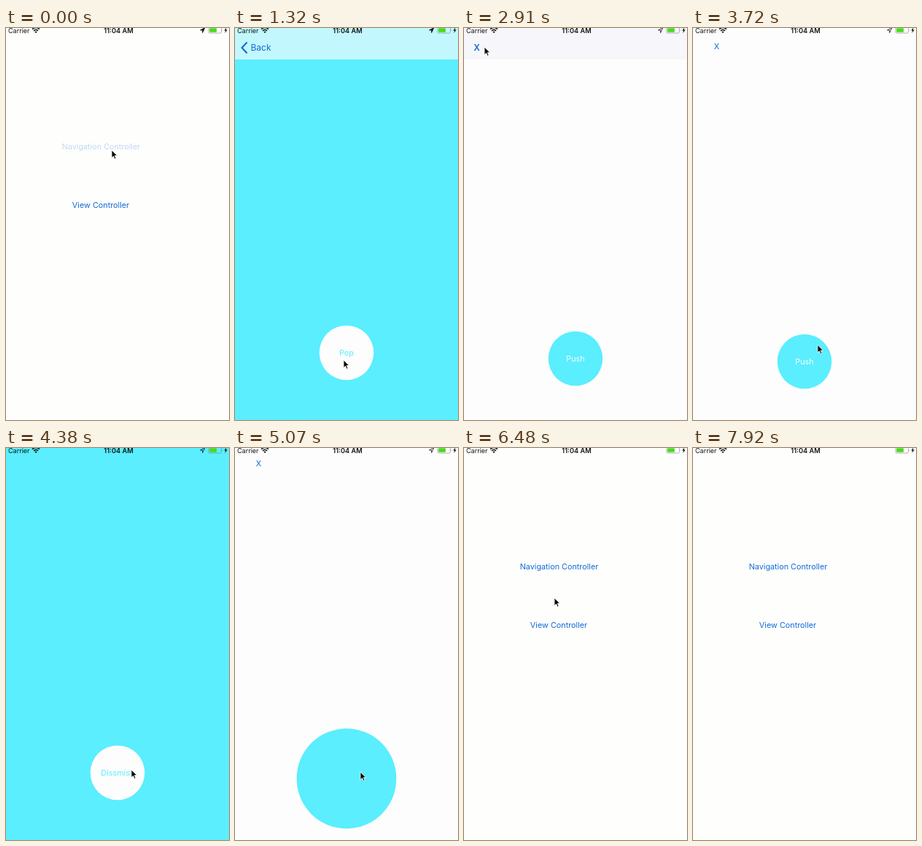
Animation of 306 by 536 pixels, one loop 7950 ms. Source, as an HTML page:

```html
<!DOCTYPE html>
<html lang="en">
<head>
<meta charset="utf-8">
<title>Bubble transition</title>
<style>
  html, body { margin: 0; width: 100%; height: 100%; overflow: hidden; background: #fefefd; }
  svg { display: block; width: 306px; height: 536px; }
  text { font: 10.8px Inter, "Liberation Sans", sans-serif; }
  .link { fill: #116bd6; }
  .mid { text-anchor: middle; }
  .cyan { fill: #5aeefe; }
  #status text { font-size: 9px; fill: #111; }
  #status .clock { font-size: 9.2px; font-weight: 600; }
</style>
</head>
<body>
<svg viewBox="0 0 306 536">
  <rect width="306" height="536" fill="#fefefd"/>
  <text id="navLink" class="link mid" x="130.5" y="166">Navigation Controller</text>
  <text id="viewLink" class="link mid" x="130" y="246">View Controller</text>

  <g id="modal">
    <rect width="306" height="536" fill="#fdfdfd"/>
    <text id="plainX" class="link mid" x="32.5" y="25">X</text>
    <circle class="cyan" cx="153" cy="452" r="37.3"/>
    <text id="push" class="mid" x="153" y="456" fill="#fdfdfd">Push</text>
    <circle id="bubble" class="cyan" cx="153" cy="452"/>
    <g id="detail">
      <rect class="cyan" width="306" height="536"/>
      <circle cx="153" cy="444" r="37.3" fill="#fdfdfd"/>
      <text id="action" class="cyan mid" x="153" y="448"></text>
    </g>
    <g id="bar">
      <rect width="306" height="43" fill="#f7f6fa"/>
      <rect id="tint" width="306" height="43" fill="#c2f8fd"/>
      <text id="barX" class="link mid" x="17.5" y="31" style="font-size:12px;font-weight:600">X</text>
      <g id="back">
        <path d="M16.5 19.5 9.5 27l7 7.5" fill="none" stroke="#116bd6" stroke-width="2.1"/>
        <text class="link" x="21.5" y="31" style="font-size:12px">Back</text>
      </g>
    </g>
  </g>

  <g id="status">
    <text x="3" y="6.5">Carrier</text>
    <path d="M36 1.6Q41-2.4 46 1.6M38 3.8Q41 1.4 44 3.8" fill="none" stroke="#111" stroke-width="1.5"/>
    <path d="M39.4 5.2Q41 4 42.6 5.2L41 7Z" fill="#111"/>
    <text class="clock mid" x="154.5" y="6.5">11:04 AM</text>
    <path id="arrow" d="M273-.5 266.5 3H269.7V6.5Z" stroke="#111" stroke-width=".8"/>
    <rect x="278" y="-1" width="17.5" height="8" rx="1.8" fill="none" stroke="#777" stroke-opacity=".7" stroke-width=".8"/>
    <rect x="279.2" y=".2" width="9.8" height="5.6" rx=".8" fill="#4cd91f"/>
    <path d="M296.7 1.5q1.3 1.5 0 3Z" fill="#777" opacity=".7"/>
    <path d="M302.6-.8 299.3 3.6H301.3L300.3 7 303.8 2.5H301.8Z" fill="#111"/>
  </g>

  <path id="cursor" d="M0 0V10.6L2.5 8.3 4.2 12.2 6 11.4 4.3 7.6H7.7Z" fill="#080808" stroke="#fff" stroke-width=".8"/>
</svg>
<script>
const LOOP = 7950, START_Y = 452, REACH = 477;
const $ = id => document.getElementById(id);
const clamp = v => Math.min(1, Math.max(0, v));
const fade = (id, v) => $(id).setAttribute("opacity", v);
const show = (id, on) => { $(id).style.display = on ? "" : "none"; };

// Cubic ease-in-out with control points (.42, 0) and (.58, 1).
function ease(x) {
  let lo = 0, hi = 1;
  for (let i = 0; i < 18; i++) {
    const u = (lo + hi) / 2, v = 1 - u;
    if (1.26 * v * v * u + 1.74 * v * u * u + u * u * u < x) lo = u; else hi = u;
  }
  return lo * lo * (3 - 2 * lo);
}

const ramp = (t, from, span) => ease(clamp((t - from) / span));

// Times at which each flow presents, pushes, returns and closes.
const flows = [
  { open: 90, grow: 620, shrink: 1520, close: 3000, action: "Pop", nav: true },
  { open: 3420, grow: 3840, shrink: 4790, close: 5800, action: "Dissmiss", nav: false }
];
const SLIDE = 320, BUBBLE = 380;

// Label presses: element, start, end.
const presses = [
  ["navLink", 0, 130], ["push", 540, 640], ["action", 1430, 1530],
  ["barX", 2950, 3030], ["viewLink", 3350, 3460], ["push", 3770, 3850],
  ["action", 4700, 4800], ["plainX", 5730, 5820]
];

// Cursor stops: time, x, y.
const stops = [
  [0, 145, 167], [160, 145, 167], [520, 149, 454], [1950, 149, 454],
  [2550, 28, 26], [3020, 28, 26], [3340, 140, 240], [3450, 140, 240],
  [3760, 172, 440], [4500, 172, 440], [4700, 172, 443], [5170, 172, 443],
  [5650, 33, 20], [5960, 33, 20], [6400, 124, 205], [6500, 124, 205], [6950, 316, 330]
];

function cursorAt(t) {
  const i = stops.findIndex(s => s[0] > t);
  if (i < 0) return stops[stops.length - 1].slice(1);
  const [a, b] = [stops[i - 1], stops[i]];
  const k = ramp(t, a[0], b[0] - a[0]);
  return [a[1] + (b[1] - a[1]) * k, a[2] + (b[2] - a[2]) * k];
}

function draw(t) {
  const flow = flows[t < flows[1].open ? 0 : 1];
  const rise = ramp(t, flow.open, SLIDE) - ramp(t, flow.close, SLIDE);
  const size = ramp(t, flow.grow, BUBBLE) - ramp(t, flow.shrink, BUBBLE);

  $("modal").setAttribute("transform", `translate(0 ${536 * (1 - rise)})`);
  show("modal", rise > 0);
  show("bar", flow.nav);
  show("plainX", !flow.nav);
  $("action").textContent = flow.action;

  $("bubble").setAttribute("r", REACH * size);
  const cy = START_Y + (268 - START_Y) * size;
  $("detail").setAttribute("transform",
    `translate(153 ${cy}) scale(${size}) translate(-153 -268)`);
  show("detail", size > 0);
  fade("detail", size * size);
  fade("tint", size);
  fade("back", size);

  for (const [id] of presses) fade(id, 1);
  fade("barX", 1 - size);
  for (const [id, from, to] of presses) if (t >= from && t < to) fade(id, 0.25);

  show("arrow", t < 6100);
  $("arrow").setAttribute("fill", t < 2000 ? "#111" : "none");
  $("cursor").setAttribute("transform", `translate(${cursorAt(t)})`);
}

const began = performance.now();
function tick() {
  const t = (performance.now() - began) % LOOP;
  draw(Math.floor(t / 30) * 30);
  requestAnimationFrame(tick);
}
tick();
</script>
</body>
</html>
```
